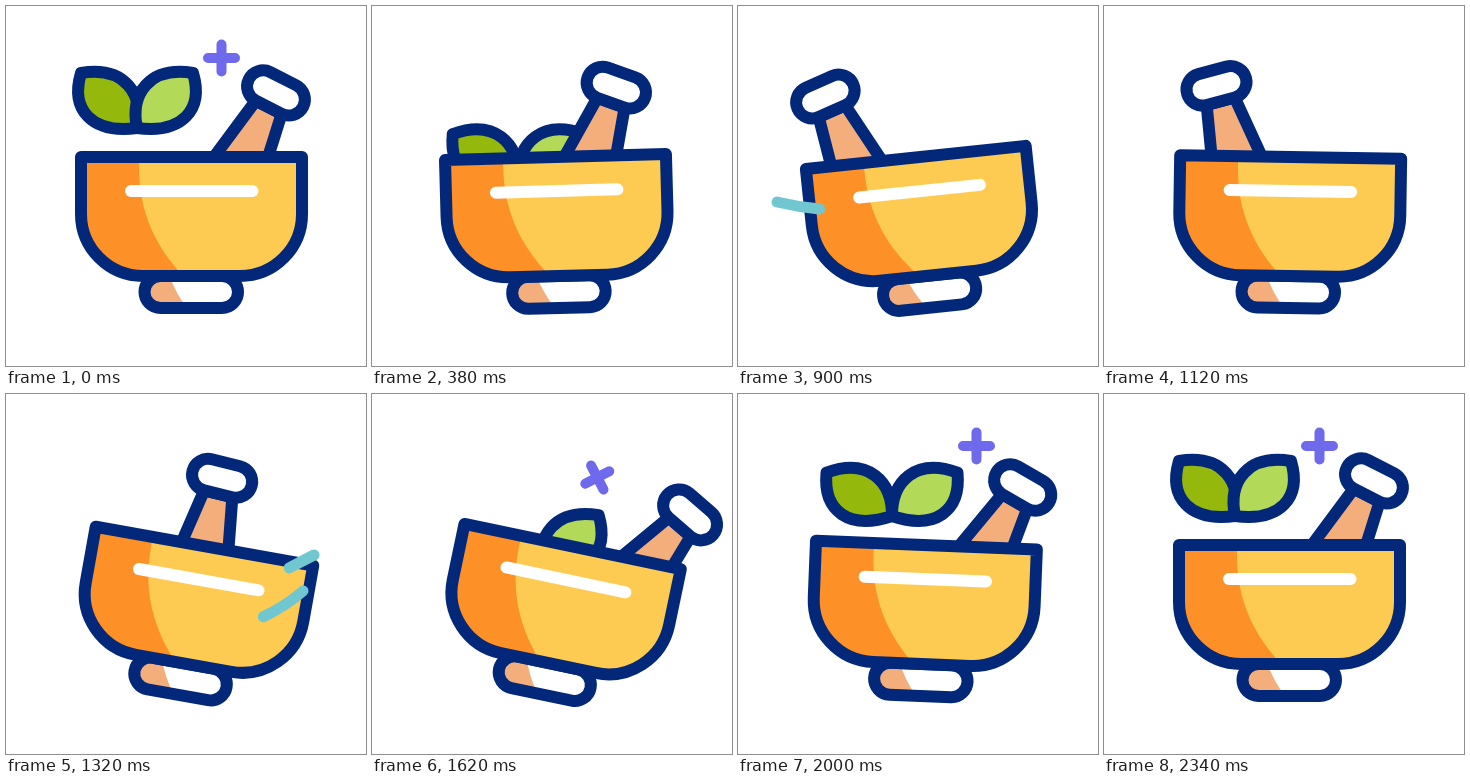
These frames come from a looping animation (360 by 360 pixels, 2.4 s). An HTML page with a canvas:

```html
<!DOCTYPE html>
<html lang="en">
<head>
<meta charset="utf-8">
<title>Mortar and pestle</title>
<style>
  html, body { margin: 0; width: 100%; height: 100%; overflow: hidden; background: #fff; }
  canvas { display: block; width: 360px; height: 360px; }
</style>
</head>
<body>
<canvas id="stage"></canvas>
<script>
const LOOP = 2400, NAVY = '#03287a', PEACH = '#f3ae7b', TEAL = '#70c7d0';
const PIVOT = [185.5, 225];
const canvas = document.getElementById('stage');
const ctx = canvas.getContext('2d');
const dpr = window.devicePixelRatio || 1;
canvas.width = canvas.height = 360 * dpr;

const clamp = v => Math.max(0, Math.min(1, v));

function ease(t, start, end) {
  const u = clamp((t - start) / (end - start));
  return u * u * (3 - 2 * u);
}

function capsule(x, y, w, h) {
  const path = new Path2D();
  path.roundRect(x, y, w, h, h / 2);
  return path;
}

const leafShape = new Path2D('M0 0C-7-34 12-62 56-55C67-18 45 6 0 0z');
const plusShape = new Path2D('M-13.5 0H13.5M0-13.5V13.5');
const shaft = new Path2D('M-14.5 16L-27 90H27L14.5 16z');
const cap = capsule(-30.5, -16, 61, 32);
const foot = capsule(138.5, 270, 93.5, 32);
const footShade = new Path2D('M130 265H162Q168 285 181 302H130z');
const bowl = new Path2D('M75 151H296V208A62 62 0 0 1 234 270H137A62 62 0 0 1 75 208z');
const bowlShade = new Path2D('M60 145H133V157C132 205 149 240 178 271H60z');
const shine = new Path2D('M125 185H246.5');
const leftDash = new Path2D('M82 203Q60 201 39 196');
const upperDash = new Path2D('M283 174L308 161');
const lowerDash = new Path2D('M257 223Q280 212 297 197');

function stroke(path, color = NAVY, width = 12) {
  ctx.strokeStyle = color;
  ctx.lineWidth = width;
  ctx.stroke(path);
}

function fill(path, color) {
  ctx.fillStyle = color;
  ctx.fill(path);
}

function at(x, y, degrees, paint) {
  ctx.save();
  ctx.translate(x, y);
  ctx.rotate(degrees * Math.PI / 180);
  paint();
  ctx.restore();
}

// 0 while floating above the bowl, 1 while hidden behind it.
const depth = (t, sunk, riseStart, riseEnd) => ease(t, 120, sunk) - ease(t, riseStart, riseEnd);

// What comes out of the bowl floats to the right of its resting place, then slides back.
const drift = t => 23 * (ease(t, 900, 1200) - ease(t, 2000, 2340));

function drawLeaf(t, side, color, delay) {
  const d = depth(t, 660, 1480 + delay, 1770 + delay);
  const open = 11 * (ease(t, 120, 380) - ease(t, 900, 1200) + ease(t, 1620, 2000) - ease(t, 2000, 2340));
  at(131 + 32 * d + drift(t), 122 + 104 * d, side * open, () => {
    ctx.scale(side, 1);
    fill(leafShape, color);
    stroke(leafShape);
  });
}

function drawPlus(t) {
  const d = depth(t, 360, 1400, 1720);
  at(215.5 - 58 * d + drift(t), 52 + 138 * d, -120 * d, () => stroke(plusShape, '#6f69ec', 10));
}

// Swings to the left rim, across to the far right, and back to rest.
function drawPestle(t) {
  const left = ease(t, 230, 900), right = ease(t, 1050, 1620), home = ease(t, 1640, 2270);
  const x = 270 - 168 * left + 192 * right - 24 * home;
  const y = 81 + 15 * ((x - 100) / 194) ** 7;
  at(x, y, 27 - 45 * left + 47 * right - 2 * home, () => {
    fill(shaft, PEACH);
    stroke(shaft);
    fill(cap, '#fff');
    stroke(cap);
  });
}

function drawShaded(outline, color, shade, shadeColor) {
  ctx.save();
  ctx.clip(outline);
  fill(outline, color);
  fill(shade, shadeColor);
  ctx.restore();
  stroke(outline);
}

function drawMortar(t) {
  const tilt = -6 * ease(t, 240, 660) + 17.8 * ease(t, 900, 1420) - 11.8 * ease(t, 1620, 2150);
  at(...PIVOT, tilt, () => {
    ctx.translate(-PIVOT[0], -PIVOT[1]);
    drawPestle(t);
    drawShaded(foot, '#fff', footShade, PEACH);
    drawShaded(bowl, '#fecb52', bowlShade, '#fd9026');
    stroke(shine, '#fff', 12);
  });
}

// A dash grows outward, then its tail follows.
function drawDash(t, path, length, start) {
  const p = (t - start) / 120;
  const head = clamp(p), tail = clamp(p - 1);
  if (head <= tail) return;
  ctx.setLineDash([(head - tail) * length, 999]);
  ctx.lineDashOffset = -tail * length;
  stroke(path, TEAL, 11);
  ctx.setLineDash([]);
}

function draw(t) {
  ctx.setTransform(dpr, 0, 0, dpr, 0, 0);
  ctx.fillStyle = '#fff';
  ctx.fillRect(0, 0, 360, 360);
  ctx.lineCap = ctx.lineJoin = 'round';
  drawPlus(t);
  drawLeaf(t, -1, '#94b80c', 100);
  drawLeaf(t, 1, '#b2d957', 0);
  drawMortar(t);
  drawDash(t, leftDash, 44, 780);
  drawDash(t, upperDash, 29, 1200);
  drawDash(t, lowerDash, 49, 1200);
}

function tick() {
  draw(performance.now() % LOOP);
  requestAnimationFrame(tick);
}
tick();
</script>
</body>
</html>
```
